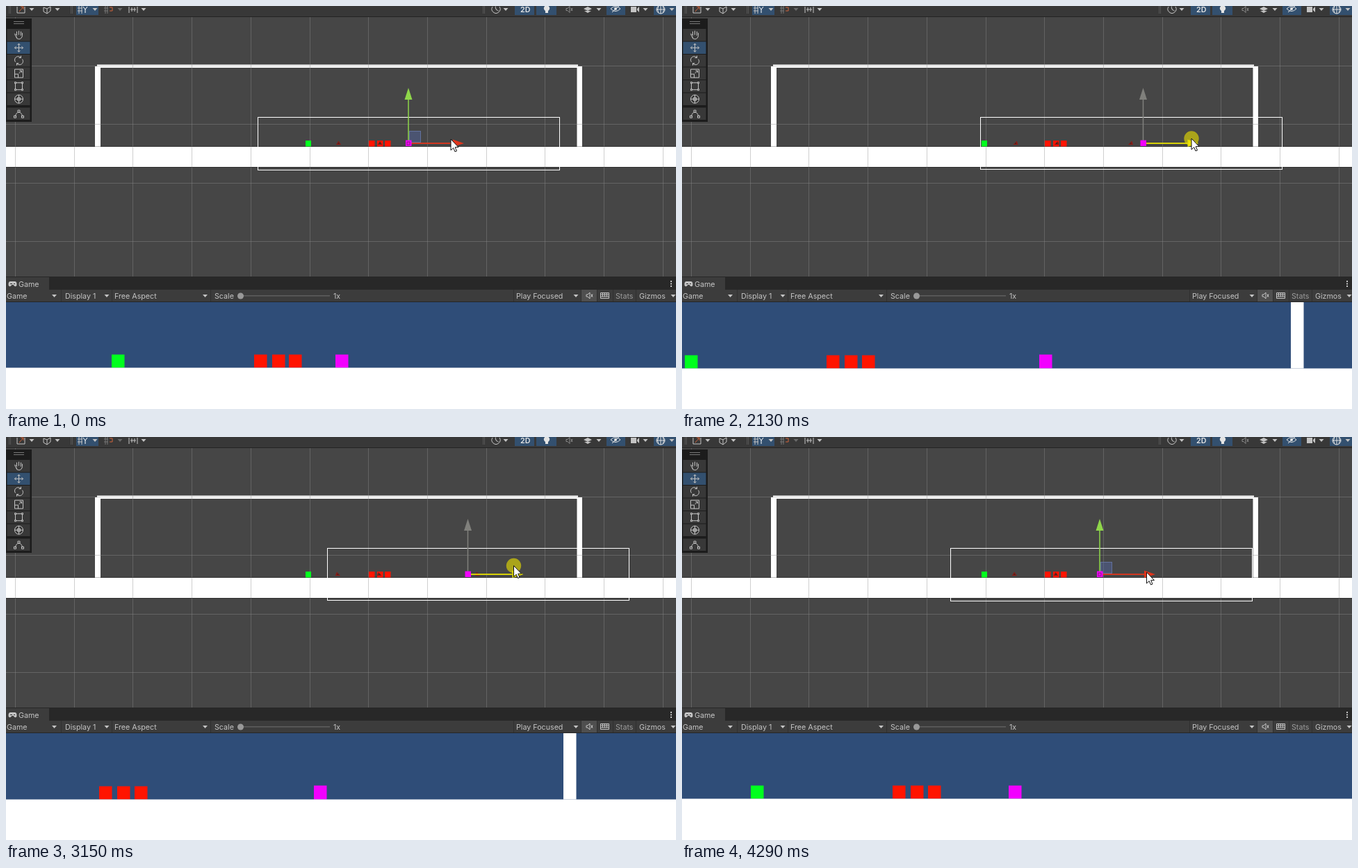
Animation, 964 px wide and 581 px high, one loop 4.34 s. Source, as an HTML page with a canvas:

```html
<!DOCTYPE html>
<html lang="en">
<head>
<meta charset="utf-8">
<style>
html, body { margin: 0; width: 100%; height: 100%; overflow: hidden; background: #464646; }
canvas { display: block; }
</style>
</head>
<body>
<canvas id="stage" width="964" height="581"></canvas>
<script>
const ctx = document.getElementById('stage').getContext('2d');
const LOOP = 4340, GRAB = 1150, DROP = 4290;
const LIGHT = '#c4c4c4', DIM = '#8a8a8a', BLUE = '#33506f', ORANGE = '#d0643c';
const GREEN = '#00ff1e', RED = '#ff1400', PINK = '#f200ff';

// time, player x, camera frame left, pointer x, pointer y
const KEYS = [
  [1150, 579, 362, 645, 198],
  [1350, 594, 368, 661.5, 198],
  [1570, 614.5, 380.5, 683, 198],
  [2130, 663.5, 428.5, 733, 191],
  [2440, 687, 454.5, 755, 187],
  [2750, 691, 472.5, 759, 186],
  [3150, 664.5, 461.5, 730.5, 185.5],
  [3570, 625.5, 425.5, 692.5, 190],
  [3800, 612, 408.6, 679.5, 192],
  [4290, 601, 386, 668.5, 195]
];
const BEATS = [1150, 1690, 2130, 2230, 2760, 3300, 3830, 4290];

function stepTime(t) {
  const start = BEATS.filter(b => b <= t).pop();
  return start + Math.floor((t - start) / 30) * 30;
}

// Smooth curve through column c of KEYS
function curve(c, t) {
  const n = KEYS.length - 1;
  if (t <= KEYS[0][0]) return KEYS[0][c];
  if (t >= KEYS[n][0]) return KEYS[n][c];
  const i = KEYS.findIndex(k => k[0] > t) - 1;
  const slope = j => j === 0 || j === n ? 0 :
    (KEYS[j + 1][c] - KEYS[j - 1][c]) / (KEYS[j + 1][0] - KEYS[j - 1][0]);
  const a = KEYS[i], b = KEYS[i + 1], d = b[0] - a[0], u = (t - a[0]) / d, v = 1 - u;
  return a[c] * v * v * (1 + 2 * u) + b[c] * u * u * (1 + 2 * v) +
    d * u * v * (slope(i) * v - slope(i + 1) * u);
}

function rect(x, y, w, h, color) {
  ctx.fillStyle = color;
  ctx.fillRect(x, y, w, h);
}
function shape(points, fill, stroke) {
  ctx.beginPath();
  points.forEach(p => ctx.lineTo(p[0], p[1]));
  ctx.closePath();
  if (fill) { ctx.fillStyle = fill; ctx.fill(); }
  if (stroke) { ctx.strokeStyle = stroke; ctx.lineWidth = 1; ctx.stroke(); }
}
function path(d, x, y, color = LIGHT, fill = false) {
  ctx.save();
  ctx.translate(x, y);
  ctx.lineWidth = 1;
  ctx.strokeStyle = ctx.fillStyle = color;
  const p = new Path2D(d);
  fill ? ctx.fill(p) : ctx.stroke(p);
  ctx.restore();
}
function disc(x, y, r, color) {
  ctx.fillStyle = color;
  ctx.beginPath();
  ctx.arc(x, y, r, 0, 7);
  ctx.fill();
}
function text(s, x, y, color = LIGHT, weight = 400) {
  ctx.font = `${weight} 10.7px Inter, sans-serif`;
  ctx.textBaseline = 'alphabetic';
  ctx.fillStyle = color;
  ctx.fillText(s, x, y);
}
const drop = (x, y, color = LIGHT) => shape([[x - 3.5, y - 2], [x + 3.5, y - 2], [x, y + 2]], color);

const MUTE = 'M-4-1.5h2l3-3v9l-3-3h-2zM3-2l2 4M5-2l-2 4';

function topBar() {
  rect(0, 0, 964, 15, '#383838');
  rect(0, 15, 964, 1, '#242424');
  [4, 93, 686].forEach(x => { rect(x, 0, 1, 11, '#565656'); rect(x + 2, 0, 1, 11, '#565656'); });
  rect(101, 0, 32, 13, BLUE);
  [[732, 28], [763, 29], [864, 27], [932, 32]].forEach(([x, w]) => rect(x, 0, w, 13, BLUE));
  [37, 74, 128, 198, 719, 853, 920, 958].forEach(x => drop(x, 5));
  drop(164, 5, '#6a6a6a');
  path('M-6-4v9h11v-9', 22, 5);
  path('M-3 3l6-7M-1-4h4v4', 22, 5, ORANGE);
  path('M-5-3v6l5 3 5-4v-6M-5-3l5 2 5-3M0-1v7', 59, 5);
  path('M-6-2h7M-6 2h7M-4-5v11M0-5v11', 109, 5);
  path('M2-3l3 4 3-4M5 1v5', 109, 4, '#fff');
  path('M-5-2h6M-5 2h6M-3-5v11M0-5v11', 146, 5, '#777');
  path('M2-3h4v5h-4', 147, 5, ORANGE);
  path('M-6-4v9M6-4v9M-4 0h8M-2-3v6M2-3v6', 183, 5);
  path('M5-3a6 6 0 1 1-10 0', 705, 4);
  path('M1-5a5 5 0 0 0 5 8a6 6 0 0 1-5-8', 704, 4, LIGHT, true);
  text('2D', 740, 9, '#e4e4e4', 600);
  path('M-2 3a4.2 4.2 0 1 1 4 0v3h-4z', 778, 4, '#e4e4e4', true);
  path(MUTE, 810, 5, DIM);
  path('M-6 0l6-3 6 3-6 3zM-5 3l5 3 5-3', 837, 4, LIGHT, true);
  path('M-7 0q7-7 14 0q-7 7-14 0M-5 5l10-9', 877, 4, '#e4e4e4');
  disc(877, 4, 2, '#e4e4e4');
  rect(899, 1, 8, 8, LIGHT);
  shape([[908, 4], [911, 1], [911, 9], [908, 6]], LIGHT);
  path('M6 0a6 6 0 1 1-12 0a6 6 0 1 1 12 0M-6 0h12M0-6v12M-3-5q-3 5 0 10M3-5q3 5 0 10', 942, 5, '#e4e4e4');
}

const TOOLS = [
  [33, 'M-4 0l-2-2M-3 4l-3-5M-3-5v6M0-6v6M3-5v6M5-3v4q-1 5-5 5t-4-4'],
  [51.5, 'M-6 0h12M0-6v12M-4-2l-2 2 2 2M4-2l2 2-2 2M-2-4l2-2 2 2M-2 4l2 2 2-2'],
  [70, 'M-5 2a5 5 0 0 1 8-6M3-7v3h-3M5-2a5 5 0 0 1-8 6M-3 7v-3h3'],
  [88.5, 'M-6-6h12v12h-12zM-6 1h5v5M0 0l4-4M1-4h3v3'],
  [107, 'M-4-5h8M-4 5h8M-5-4v8M5-4v8M-6-6h2v2h-2zM4-6h2v2h-2zM-6 4h2v2h-2zM4 4h2v2h-2z'],
  [125.5, 'M6 0a6 6 0 1 1-12 0a6 6 0 1 1 12 0M-6 0h12M0-6v12M-2-2h4v4h-4z'],
  [146.5, 'M-5 4q1-6 5-6t5 6M-7 3h3v3h-3zM4 3h3v3h-3zM-1.5-5h3v3h-3z']
];

function toolPanel() {
  rect(0, 18, 37, 149, '#1c1c1c');
  rect(11, 22, 15, 1, '#777');
  rect(11, 25, 15, 1, '#777');
  TOOLS.forEach(([y, d], i) => {
    rect(1.5, y, 33, 17.5, i === 1 ? BLUE : '#383838');
    path(d, 18.5, y + 8.7);
  });
}

function gameBar() {
  rect(0, 390, 964, 19, '#282828');
  rect(0, 391, 62, 18, '#3c3c3c');
  rect(0, 409, 964, 18, '#3c3c3c');
  rect(0, 426, 964, 1, '#262626');
  path('M-3-4h6q3 0 3 4t-3 3l-2-2h-2l-2 2q-3 1-3-3t3-4', 9.5, 401, LIGHT, true);
  rect(6, 400, 3, 1, '#333');
  rect(11, 400, 2, 1, '#333');
  text('Game', 18, 405);
  [396, 399.5, 403].forEach(y => rect(956, y, 2, 2, LIGHT));
  rect(828, 409, 22, 17, '#4f4f4f');
  [79, 152, 294, 730, 827, 850, 873, 906].forEach(x => rect(x, 409, 1, 17, '#303030'));
  text('Game', 1, 422);
  text('Display 1', 85, 422);
  text('Free Aspect', 156, 422);
  text('Scale', 300, 422);
  text('1x', 471, 422);
  text('Play Focused', 734, 422);
  text('Stats', 877, 422, '#9c9c9c');
  text('Gizmos', 911, 422);
  [69.5, 145, 286.5, 820, 960].forEach(x => drop(x, 418));
  rect(338, 417, 128, 1.5, '#5e5e5e');
  disc(337.5, 418, 4.5, '#999');
  path(MUTE, 839, 417.5);
  path('M-6-4h12v8h-12zM-6-1.5h12M-6 1.5h12M-3-4v5.5M0-4v5.5M3-4v5.5', 861.5, 417.5);
}

function world() {
  rect(0, 16, 964, 374, '#464646');
  rect(0, 203, 964, 29, '#fff');
  rect(128, 87, 8, 116, '#fff');
  rect(821.5, 87, 7.5, 116, '#fff');
  rect(131, 84.5, 692, 4.5, '#fff');
  const grid = 'rgba(140,140,140,.42)';
  for (let i = 0; i < 12; i++) rect(Math.round(13 + i * 84.7), 16, 1, 374, grid);
  [86, 170, 255, 339].forEach(y => rect(0, y, 964, 1, grid));
  rect(0, 202, 964, 1, 'rgba(0,0,0,.25)');
  rect(0, 232, 964, 1, 'rgba(0,0,0,.35)');
}

function marker(x, lean) {
  shape([[x - 3.5, 200], [x + lean * .1, 194.5], [x + 3.5, 200]], '#8c1a14');
  rect(x - 1, 197, 2, 2, '#4a2420');
}

function gizmo(x, dragging) {
  const up = dragging ? '#80807c' : '#8fd64a', side = dragging ? '#e6e000' : '#e0351c';
  if (!dragging) {
    rect(x + 1, 180, 17, 17, 'rgba(80,100,165,.45)');
    ctx.strokeStyle = '#62719c';
    ctx.lineWidth = 1;
    ctx.strokeRect(x + 1.5, 180.5, 16, 16);
  }
  rect(x - .75, 134, 1.5, 60, up);
  shape([[x, 118], [x + 5.5, 135], [x - 5.5, 135]], up);
  rect(x + 4, 197, 60, 1.8, side);
  shape([[x + 64, 192.5], [x + 80, 198], [x + 64, 203]], side);
}

function sceneView(player, cam, dragging) {
  const lag = player - 217 - cam;
  rect(431, 194, 8, 8.5, GREEN);
  [522, 534, 545].forEach(x => rect(x, 194, 8.5, 8.5, RED));
  marker(478.5 + lag * .08, lag);
  marker(538 + lag * .06, lag);
  ctx.strokeStyle = '#fff';
  ctx.lineWidth = 1;
  ctx.strokeRect(Math.round(cam) + .5, 160.5, 434, dragging ? 75 : 76);
  marker(cam + 217, lag);
  gizmo(player, dragging);
  rect(player - 4, 193.5, 8.5, 8.5, PINK);
  if (!dragging) {
    ctx.strokeStyle = '#8d1a80';
    ctx.strokeRect(player - 2, 196, 4, 4);
  }
}

function gameView(player, cam, dragging) {
  const ground = dragging ? 522.5 : 521.5;
  const left = x => Math.round((x - cam) * 2.236 - 11.2);
  rect(0, 427, 964, 154, '#2f4d78');
  const block = (x, color, y = ground - 19) => rect(left(x), y, 18.5, ground - y, color);
  block(825.2, '#fff', 427);
  block(435.2, GREEN);
  [526.5, 538.2, 549.2].forEach(x => block(x, RED));
  block(player, PINK, 502.5);
  rect(0, ground, 964, 581 - ground, '#fff');
}

function pointer(x, y) {
  const outline = [[0, 0], [0, 16], [3.7, 12.6], [6, 18], [8.5, 17], [6.2, 11.7], [11, 11.5]];
  shape(outline.map(p => [x + p[0], y + p[1]]), '#fff', '#111');
}

function pointerAt(t) {
  if (t >= GRAB) return [curve(3, t), curve(4, t)];
  const ramp = (from, to, n) => Math.min(n, Math.max(0, Math.floor((t - from) / (to - from) * (n - 1)) + 1)) / n;
  return [640 + 5 * ramp(390 + 520, 990, 3), 192 + 6 * ramp(390, 510, 4)];
}

function draw(now) {
  let t = now % LOOP;
  if (t >= GRAB) t = stepTime(t);
  const dragging = t >= GRAB && t < DROP;
  const player = curve(1, t), cam = curve(2, t), [mx, my] = pointerAt(t);
  world();
  sceneView(player, cam, dragging);
  topBar();
  toolPanel();
  gameBar();
  gameView(player, cam, dragging);
  if (dragging) disc(mx, my, 10.7, 'rgba(232,222,0,.62)');
  pointer(mx, my);
}

const began = performance.now();
function tick() {
  draw(performance.now() - began);
  requestAnimationFrame(tick);
}
tick();
</script>
</body>
</html>
```
